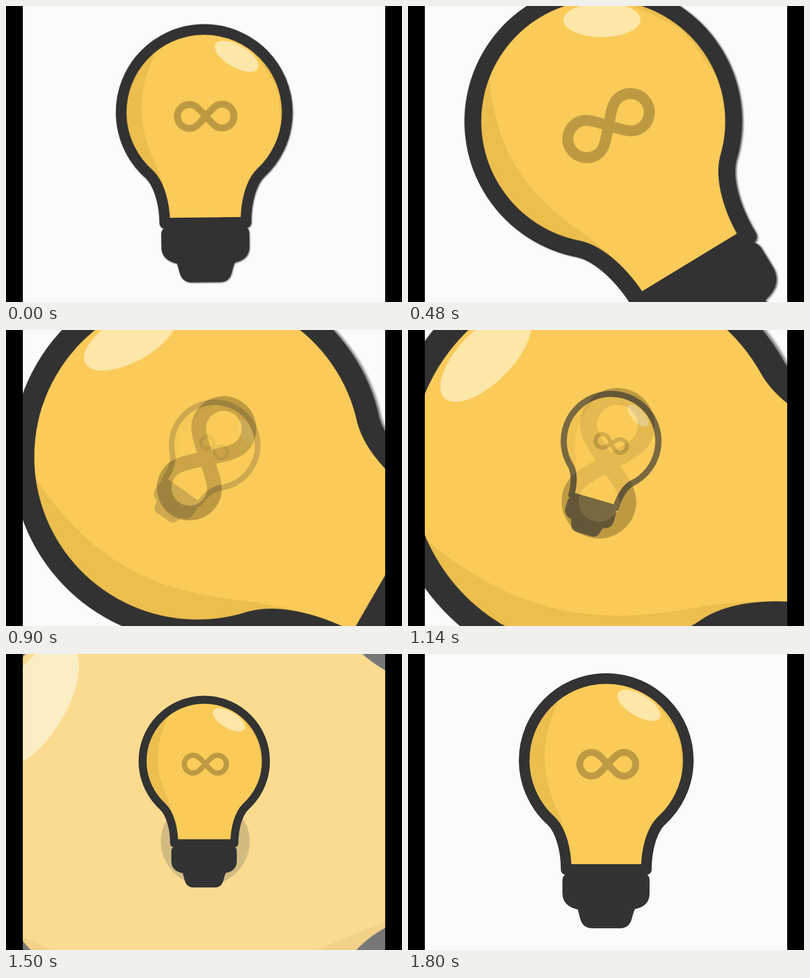
Recreate the animation shown at these times as an HTML page. Size 800 by 600 pixels, loop 1830 ms.

```html
<!DOCTYPE html>
<html lang="en">
<head>
<meta charset="utf-8">
<title>Endless bulb</title>
<style>
  html, body { margin: 0; width: 100%; height: 100%; overflow: hidden; background: #000; }
  svg { display: block; width: 100%; height: 100%; }
</style>
</head>
<body>
<svg viewBox="0 0 800 600">
  <defs>
    <path id="glass" d="M319.5 437C319.5 395 308 357 289.5 338.5A165.75 165.75 0 1 1 511.5 338.5C493 357 481.5 395 481.5 437"/>
    <clipPath id="inside"><use href="#glass"/></clipPath>
    <filter id="shadow" x="-5%" y="-5%" width="110%" height="110%">
      <feDropShadow dx="1.3" dy="1.6" stdDeviation="1" flood-color="#000" flood-opacity=".5"/>
    </filter>
    <g id="bulb">
      <use href="#glass" fill="#facb58"/>
      <g clip-path="url(#inside)" fill="#ecbe4e">
        <path d="M308 88C262 180 270 245 302 318Q316 350 324 384H200V88Z"/>
        <path d="M490 85C510 110 532 140 545 165L550 190L553 240H600V85Z"/>
      </g>
      <ellipse rx="49" ry="22" transform="translate(466.5 104) rotate(31)" fill="#fce6a8"/>
      <path fill="none" stroke="#bd9a43" stroke-width="14" stroke-linejoin="round"
        d="M403.5 223.5C388 206 382 199.5 371 199.5a24 24 0 0 0 0 48C382 247.5 388 241 403.5 223.5S425 199.5 436 199.5a24 24 0 0 1 0 48C425 247.5 419 241 403.5 223.5Z"/>
      <use href="#glass" fill="none" stroke="#333" stroke-width="21.5" stroke-linecap="round"/>
      <path fill="#333" d="M320 426H481V446Q488 449 488 459V485Q488 511 459 517Q457 518 452 537Q447 556 428 556H373Q353 556 348 537L343 518Q312 511 312 485V459Q312 449 320 446Z"/>
    </g>
  </defs>
  <rect x="34" width="732" height="600" fill="#fbfbfb"/>
  <g id="outer"><use href="#bulb" filter="url(#shadow)"/></g>
  <g id="inner"><use href="#bulb"/></g>
  <path d="M0 0H34V600H0ZM766 0H800V600H766Z"/>
</svg>
<script>
const LOOP = 1830, STEP = 30;
const APPEAR = 25, SETTLE = 43.7, END = 59; // in steps
const outer = document.getElementById('outer');
const inner = document.getElementById('inner');
const part = (k, from, to) => Math.min(1, Math.max(0, (k - from) / (to - from)));

function place(el, x, y, angle, scale, px, py, alpha) {
  el.setAttribute('transform',
    `translate(${x} ${y}) rotate(${angle}) scale(${scale}) translate(${-px} ${-py})`);
  el.setAttribute('opacity', alpha);
}

function draw(now) {
  // the first picture is held for two steps
  const k = Math.max(0, Math.floor(now % LOOP / STEP) - 1);
  const settle = part(k, APPEAR, SETTLE), swap = part(k, SETTLE, END);

  place(outer, 403.5 + .17 * k - .0039 * k * k, 223.5 + 1.26 * k,
    -Math.min(90, 2.05 * (k + .3)), 1 + .0385 * (k + .3), 403.5, 223.5, 1 - swap);

  place(inner, 400.5 + 24 * (1 - settle), 222.5 + 18 * (1 - settle),
    45 * (1 - settle), .5 + .12 * settle + .38 * swap, 400.5, 222.5, settle);
}

let start;
function tick(now) {
  start ??= now;
  draw(now - start);
  requestAnimationFrame(tick);
}
draw(0);
requestAnimationFrame(tick);
</script>
</body>
</html>
```
